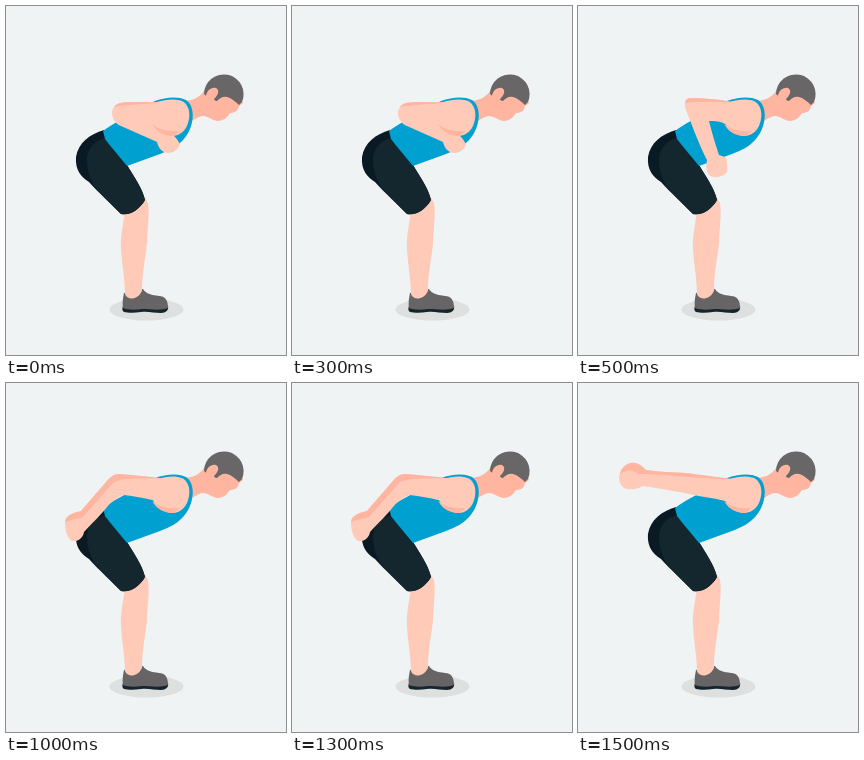
Write an HTML page that moves like this. It is 280 px wide and 349 px high and loops after 2 s.

```html
<!DOCTYPE html>
<html lang="en">
<head>
<meta charset="utf-8">
<title>Bent-over kickback</title>
<style>
  html, body { margin: 0; width: 100%; height: 100%; overflow: hidden; background: #eff3f4; }
  svg { display: block; width: 280px; height: 349px; }
  .skin { fill: #ffcab8; }
  .shade { fill: #ffb5a0; }
  .pose { visibility: hidden; animation: show 2s step-end infinite; }
  @keyframes show {
    0% { visibility: visible; }
    25%, 100% { visibility: hidden; }
  }
</style>
</head>
<body>
<svg viewBox="0 0 280 349">
  <ellipse cx="140.5" cy="303.5" rx="37" ry="11" fill="#dee0e0"/>

  <g id="leg">
    <path fill="#13252e" d="M117 300L162 300C163 304 160 307 155 307C148 307 142 305 135 306C129 307 122 307 118 306C116 305 116 302 117 300Z"/>
    <path fill="#666465" d="M118 287L137 283C140 288 146 289 153 290C159 290 162 294 162 302C154 305 145 303 136 303C129 304 122 304 117 302C116 297 117 292 118 287Z"/>
    <path class="skin" d="M119 204C118 216 114 228 115 243C116 260 119 275 119 288C121 294 131 295 136 285C136 268 139 254 141 238C141 222 144 210 142 197L138 190Z"/>
  </g>

  <g id="shorts">
    <path fill="#0a1a24" d="M98 124C84 128 72 137 70 151C69 164 75 171 83 176C93 187 106 199 115 208C124 210 134 203 139 194C136 181 128 171 121 159L110 140Z"/>
    <path fill="#14272f" d="M99 132C87 135 81 144 81 154C81 164 84 171 88 180C97 190 107 200 115 208C124 210 134 203 139 194C136 181 128 171 121 159Z"/>
  </g>

  <g id="head">
    <path class="shade" d="M174 95C187 95 193 92 198 85L206 82L230 80C234 86 235 91 237 97L233 100C232 105 229 107 224 107C221 112 217 115 211 115C206 114 203 111 198 110C194 110 190 112 186 115Z"/>
    <path fill="#686667" d="M198 88A19.8 19.8 0 1 1 236 96L233 99C229 95 225 92 221 91C217 90 214 92 211 95C208 95 207 92 208 89L203 91C200 90 199 89 198 88Z"/>
    <path class="shade" d="M200 91C200 85 205 81 210 82C214 84 212 89 209 92C207 95 203 94 200 91Z"/>
  </g>

  <path id="shirt" fill="#00a0d1" d="M97 125C107 117 118 113 130 105L149 95C160 91 172 90 180 94C186 98 188 107 186 116C185 122 181 131 175 136C170 141 164 144 154 148L121 160C113 150 105 141 99 133Z"/>
  <path class="skin" d="M148 97C160 93 173 92 179 97C185 103 184 113 181 120C177 128 169 132 161 129C153 127 149 122 147 117Z"/>
  <g id="arms"></g>
  <path class="shade" d="M146 118C152 123 161 126 173 125C170 130 165 131 160 129C153 127 149 123 146 118Z"/>
</svg>
<script>
  const STEP = 500;
  const LOOP = 4 * STEP;

  const poses = [
    {
      arm: "M153 96C139 97 126 95 114 97C108 99 106 103 106 108C107 114 110 118 115 120L151 136C152 141 156 147 162 147C168 147 172 143 174 139C172 133 168 129 164 128L176 118L174 98Z",
      shade: "M153 96C139 97 126 95 114 97C111 98 109 99 108 101C122 98 138 99 153 96Z"
    },
    {
      arm: "M153 96C139 93 126 92 112 92C107 93 106 98 108 104C114 119 121 139 129 154C128 160 128 166 131 169C136 173 145 171 149 166C150 160 149 154 147 151L141 149C138 140 134 127 131 115C137 115 142 115 147 118L172 120L174 98Z",
      shade: "M153 96C139 93 126 92 112 92C109 92 107 95 107 97C122 95 138 97 153 96Z"
    },
    {
      arm: "M153 95C139 93 125 92 113 91C108 91 104 94 100 99C92 109 83 118 75 128C67 130 60 132 59 138C59 145 60 154 66 158C72 159 77 155 78 149C86 140 95 132 101 124C107 117 112 114 118 112C128 113 138 115 146 117L172 120L174 98Z",
      shade: "M153 95C139 93 125 92 113 91C108 91 104 94 100 99C92 109 83 118 75 128C67 130 60 132 59 139C66 136 72 136 77 134C87 123 97 111 106 101C112 94 136 96 153 95Z"
    },
    {
      arm: "M153 96C139 94 123 92 108 90C94 89 81 89 68 87C64 83 59 79 53 80C46 82 42 87 41 94C41 100 44 106 50 106C56 107 61 105 65 103C80 105 96 108 111 111C124 114 136 115 147 118L172 120L174 98Z",
      shade: "M153 96C139 94 123 92 108 90C94 89 81 89 68 87C64 83 59 79 53 80C47 81 43 86 42 91C48 87 55 86 60 91C80 90 120 96 153 96Z"
    }
  ];

  const add = (parent, tag, attrs) => {
    const el = document.createElementNS("http://www.w3.org/2000/svg", tag);
    for (const key in attrs) el.setAttribute(key, attrs[key]);
    return parent.appendChild(el);
  };

  const arms = document.getElementById("arms");
  poses.forEach(({ arm, shade }, i) => {
    const g = add(arms, "g", { class: "pose" });
    g.style.animationDelay = `${i * STEP - LOOP}ms`;
    add(g, "path", { class: "skin", d: arm });
    add(g, "path", { class: "shade", d: shade });
  });
</script>
</body>
</html>
```
